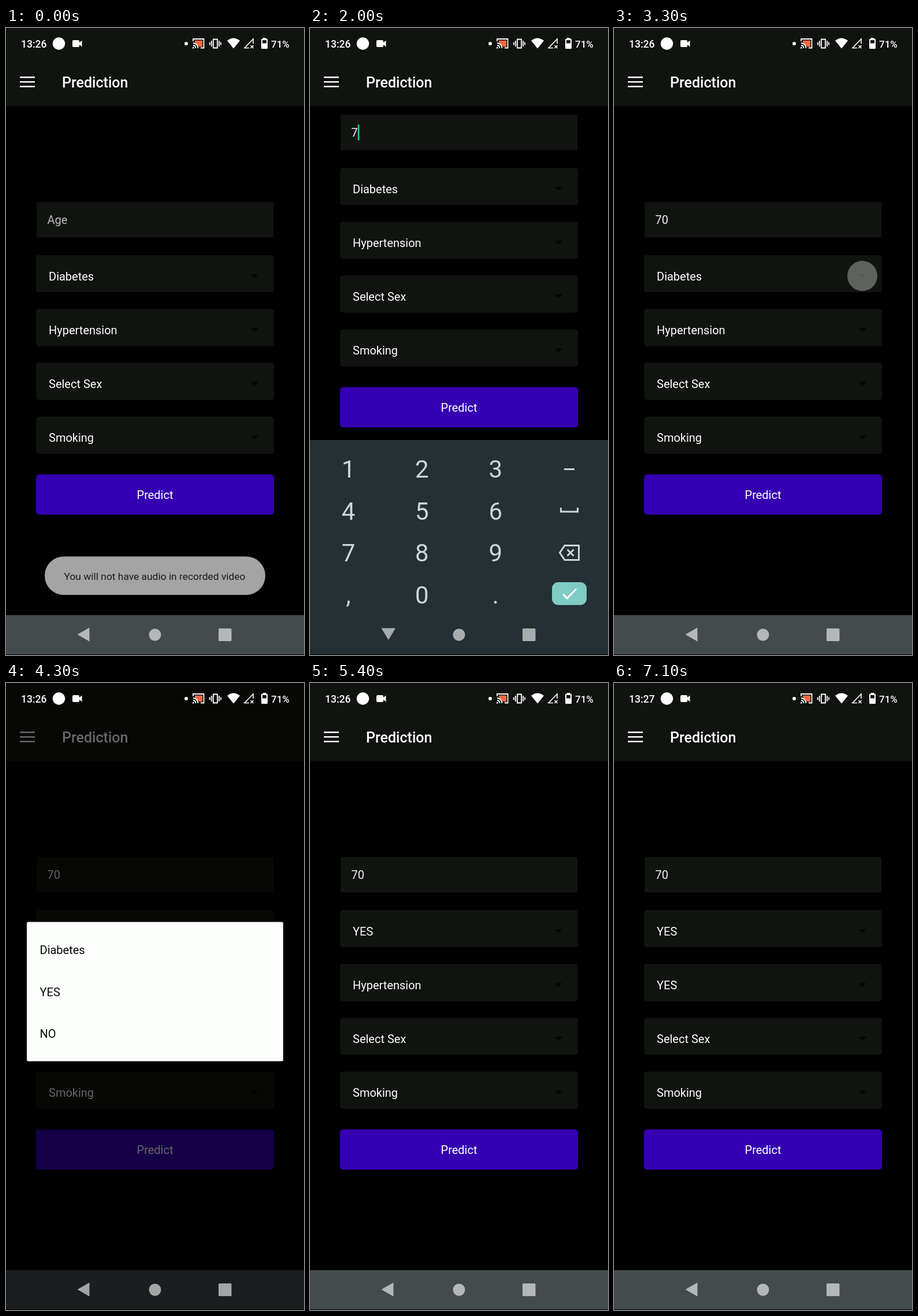
Write an HTML page with a canvas that moves like this. It is 516x1085 px and loops after 8000 ms.

```html
<!DOCTYPE html>
<html lang="en">
<head>
<meta charset="utf-8">
<title>Prediction form</title>
<style>
  html, body { margin: 0; width: 516px; height: 1085px; overflow: hidden; background: #000; }
  canvas { display: block; }
</style>
</head>
<body>
<canvas id="stage" width="516" height="1085"></canvas>
<script>
const ctx = document.getElementById('stage').getContext('2d');
const LOOP = 8000, STEP = 100;
const PANEL = '#111310', KEYBOARD = '#243033', KEY = '#d0d5d5';
const DIALOGS = [
  { title: 'Diabetes', y: 429, open: 4000, press: 5000, close: 5100 },
  { title: 'Hypertension', y: 522, open: 5900, press: 6700, close: 6800 }
];

const clamp = v => Math.max(0, Math.min(1, v));

function rect(x, y, w, h, color) {
  ctx.fillStyle = color;
  ctx.fillRect(x, y, w, h);
}

function box(x, y, w, h, r, color) {
  ctx.beginPath();
  ctx.roundRect(x, y, w, h, r);
  ctx.fillStyle = color;
  ctx.fill();
}

function disc(x, y, r, color) {
  ctx.beginPath();
  ctx.arc(x, y, r, 0, Math.PI * 2);
  ctx.fillStyle = color;
  ctx.fill();
}

function poly(points, color) {
  ctx.beginPath();
  points.forEach(([x, y]) => ctx.lineTo(x, y));
  ctx.fillStyle = color;
  ctx.fill();
}

function stroke(path, color, width) {
  ctx.strokeStyle = color;
  ctx.lineWidth = width;
  ctx.stroke(new Path2D(path));
}

function text(str, x, y, size, color, weight = 400, align = 'left') {
  ctx.font = `${weight} ${size}px Roboto, sans-serif`;
  ctx.textAlign = align;
  ctx.fillStyle = color;
  ctx.fillText(str, x, y);
}

function faded(alpha, draw) {
  if (alpha <= 0) return;
  ctx.save();
  ctx.globalAlpha = alpha;
  draw();
  ctx.restore();
}

function drawHeader() {
  rect(0, 0, 516, 134, PANEL);
  rect(0, 134, 516, 2, '#0a0b09');
  for (const y of [84, 92, 100]) rect(24, y, 26, 2.5, '#fff');
  text('Prediction', 97, 102.5, 25, '#fff', 500);
}

function drawStatus(t) {
  text(t < 6900 ? '13:26' : '13:27', 26, 33.5, 17.5, '#fff', 500);
  disc(91.5, 27, 10.7, '#fff');
  box(115, 21, 12, 12, 2, '#fff');
  poly([[126, 26], [131.5, 21.5], [131.5, 32.5], [126, 28]], '#fff');

  disc(312, 27, 3, '#fff');
  poly([[327, 21.5], [340, 21.5], [340, 32.5], [335, 32.5], [327, 25]], '#f06a42');
  stroke('M324 23V19H342.5V34.5H337 M324 26Q332 27 332.5 35 M324 30Q328.500 30.500 328.500 35', '#fff', 1.8);
  rect(323, 33, 2.5, 2.5, '#fff');
  stroke('M359 19.500H366V34.500H359Z M356 22V32 M369 22V32 M353 24.500V29.500 M372 24.500V29.500', '#fff', 1.8);

  ctx.fillStyle = '#fff';
  ctx.fill(new Path2D('M383 22Q394 13 405 22L394 35.500Z'));
  stroke('M421 34.500H413L428 19V27 M423.500 30L428.500 35 M428.500 30L423.500 35', '#fff', 1.6);
  rect(445, 17, 5, 3, '#fff');
  box(442, 18.5, 11, 17.5, 1.5, '#fff');
  rect(444, 21, 7, 5.5, PANEL);
  text('71%', 459, 33.5, 17, '#fff', 500);
}

function drawForm(t, shift) {
  const age = t < 1900 ? '' : t < 2300 ? '7' : '70';
  ctx.save();
  ctx.translate(0, shift);
  box(53, 301, 410, 61.5, 2, PANEL);
  text(age || 'Age', 71.5, 339, 20, age ? '#f4f4f4' : '#bcbcbc');

  const blinkOn = t >= 1900 || (t - 400) % 1000 < 500;
  if (t >= 400 && t < 2900 && blinkOn) {
    rect(72 + age.length * 10.8, 318, 2.6, 27.5, '#1fc7b5');
  }

  const labels = DIALOGS.map(d => t < d.close ? d.title : 'YES');
  [...labels, 'Select Sex', 'Smoking'].forEach((label, i) => {
    const y = 393 + i * 93.15;
    box(52, y, 412, 64.3, 5, PANEL);
    text(label, 74, y + 43.5, 20, '#fff');
    poly([[423.5, y + 33], [437, y + 33], [430.2, y + 39.5]], '#040504');
  });
  box(52, 772.5, 412, 69.5, 5, '#3500b1');
  text('Predict', 258, 815, 20, '#fff', 400, 'center');
  ctx.restore();
}

function drawKeyboard(t, rest) {
  faded(1 - rest, () => {
    ctx.save();
    ctx.beginPath();
    ctx.rect(0, 713, 516, 303);
    ctx.clip();
    ctx.translate(0, 30 * rest);
    rect(0, 713, 516, 303, KEYBOARD);
    if (t === 1800) box(3, 874, 126, 69, 8, 'rgba(255,255,255,.07)');

    ['123', '456', '789', ',0.'].forEach((row, r) => {
      [...row].forEach((key, c) => {
        text(key, 66.5 + c * 127.4, 778 + r * 72.6, 42, KEY, 400, 'center');
      });
    });
    rect(440, 762, 18, 3, KEY);
    stroke('M434.500 830V837H463.500V830', KEY, 3);
    stroke('M441 895.500H465.500V920.500H441L432.500 908Z M445.500 902.500L456.500 913.500 M456.500 902.500L445.500 913.500', KEY, 3);
    box(419, 959, 60, 39.5, 11, '#80cbc4');
    stroke('M438 979.500L445 987L461 970.500', '#fff', 3);
    ctx.restore();
  });
}

function drawNavIcons(keyboardUp) {
  const color = 'rgba(255,255,255,.6)';
  poly(keyboardUp
    ? [[123.5, 1038.5], [148, 1038.5], [135.8, 1059]]
    : [[123.5, 1049.5], [144.5, 1037.5], [144.5, 1061.5]], color);
  disc(258, 1050, 10.5, color);
  box(368, 1039, 22.5, 22, 1.5, color);
}

function drawTouch(t) {
  const [first, second] = DIALOGS;
  if (t >= 3200 && t < 4200) {
    const growing = t < 3300;
    disc(430, first.y, growing ? 18 : 26, `rgba(255,255,255,${growing || t >= 4100 ? 0.2 : 0.33})`);
  }
  if (t >= 5900 && t < 6100) {
    disc(430, second.y, 26, `rgba(255,255,255,${t < 6000 ? 0.33 : 0.2})`);
  }
}

function dialogLevel(d, t) {
  return clamp((t - d.open) / 200) * (1 - clamp((t - d.close) / 200));
}

function drawDialog(d, t) {
  faded(dialogLevel(d, t), () => {
    box(36, 413.5, 444, 241, 2.5, '#fdfffd');
    if (t >= d.press) {
      ctx.save();
      ctx.beginPath();
      ctx.rect(36, 498, 444, 72.5);
      ctx.clip();
      disc(258, 534, 139 + (t - d.press) * 1.2, '#eeefed');
      ctx.restore();
    }
    [d.title, 'YES', 'NO'].forEach((label, i) => text(label, 58.5, 469 + i * 72.6, 20, '#080808'));
  });
}

function draw(t) {
  const raised = t >= 500 && t < 3000;
  const closing = t >= 2900;
  const rest = closing ? clamp((t - 2800) / 300) ** 1.3 : (1 - clamp((t - 400) / 390)) ** 2;

  rect(0, 0, 516, 1085, '#000');
  drawForm(t, raised ? -151 : 0);
  if (raised && !closing) rect(0, 713, 516, 303, '#fff');
  drawKeyboard(t, rest);
  drawHeader();
  rect(0, 1016, 516, 68, raised ? KEYBOARD : '#434b4d');
  drawTouch(t);

  faded(0.6 * Math.max(...DIALOGS.map(d => dialogLevel(d, t))), () => rect(0, 0, 516, 1084, '#000'));
  DIALOGS.forEach(d => drawDialog(d, t));
  drawStatus(t);
  drawNavIcons(raised);

  faded(1 - t / 160, () => {
    box(67, 914.5, 382, 66.5, 33, '#a4a4a4');
    text('You will not have audio in recorded video', 257.5, 955, 17.4, '#1b1b1b', 400, 'center');
  });
}

const start = performance.now();
function tick() {
  const elapsed = (performance.now() - start) % LOOP;
  draw(Math.floor(elapsed / STEP) * STEP);
  requestAnimationFrame(tick);
}
tick();
</script>
</body>
</html>
```
